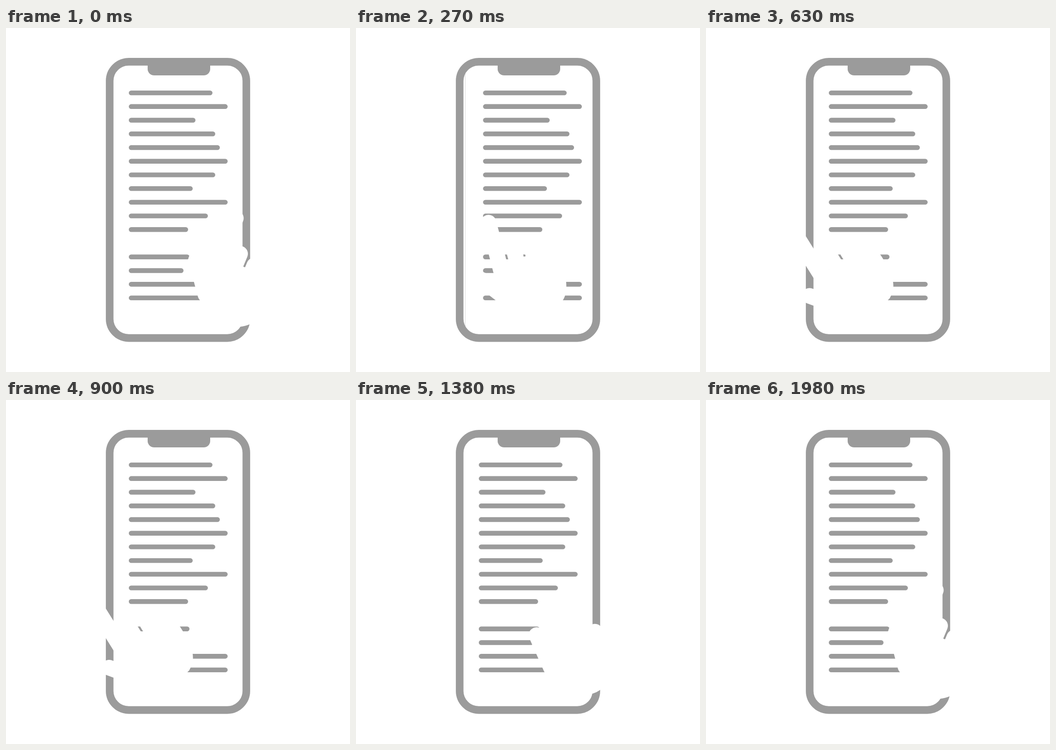
Animation of 748x748 px, one loop 2400 ms. Source, as an HTML page:

```html
<!DOCTYPE html>
<html lang="en">
<head>
<meta charset="utf-8">
<title>Swipe</title>
<style>
  html, body { margin: 0; width: 100%; height: 100%; overflow: hidden; background: #fff; }
  svg { display: block; width: 100%; height: 100%; }
</style>
</head>
<body>
<svg viewBox="0 0 748 748">
  <defs>
    <clipPath id="screen"><rect x="226" y="74" width="296" height="600" rx="40"/></clipPath>
    <path id="page" fill="none" stroke="#9b9b9b" stroke-width="10.4" stroke-linecap="round"/>
  </defs>
  <g clip-path="url(#screen)">
    <use id="oldPage" href="#page"/>
    <use id="newPage" href="#page"/>
    <path id="seam" d="M0 85V658" stroke="#9b9b9b" opacity=".4"/>
  </g>
  <rect x="225.4" y="73.4" width="297.2" height="600.7" rx="41.5" fill="none" stroke="#9b9b9b" stroke-width="16.6"/>
  <path d="M308 76H444V89a14 14 0 0 1-14 14H322a14 14 0 0 1-14-14Z" fill="#9b9b9b"/>
  <g id="hand" fill="#fff">
    <path id="fingers" fill="none" stroke="#fff" stroke-width="34" stroke-linecap="round"/>
    <path d="M-17 91H131.9C133 120 135 150 130 171C126 192 118 204 100 214C70 222 30 220 4 205L-17 150Z"/>
  </g>
</svg>
<script>
const LOOP = 2400, STEP = 30;
const SWIPE_TIME = 300, PAGE_GAP = 328;
const LEFT = 267, CAP = 5.2, FIRST_ROW = 141.1, ROW_GAP = 29.72;
const FINGER_GAP = 38.3, WRIST = { x: 40, y: 230 };

// Right end of each text row; 0 leaves the row blank.
const rowEnds = [449, 482, 412, 455, 465, 482, 455, 406, 482, 439, 396, 0, 399, 386, 482, 482];

const el = id => document.getElementById(id);
const mix = (a, b, u) => a + (b - a) * u;
const smooth = u => u * u * (3 - 2 * u);
const phase = (t, from, to) => Math.min(Math.max((t - from) / (to - from), 0), 1);

// Cubic Bezier easing with flat ends and handles at x1 and x2.
const bezier = (x1, x2) => u => {
  let low = 0, high = 1;
  for (let i = 0; i < 24; i++) {
    const s = (low + high) / 2, r = 1 - s;
    if (3 * r * r * s * x1 + 3 * r * s * s * x2 + s ** 3 < u) low = s;
    else high = s;
  }
  return smooth(low);
};
const tiltOut = bezier(0.457, 0), tiltBack = bezier(0.58, 0), slideOut = bezier(0.276, 0.094);

function handPose(t) {
  const out = phase(t, 0, 750);
  const swing = tiltOut(out) - tiltBack(phase(t, 780, 1980));
  const slide = slideOut(out) - smooth(phase(t, 1050, 1390));
  const lift = tiltOut(out) - smooth(phase(t, 900, 1110));
  return {
    x: mix(448.3, 356, slide),
    y: mix(641.2, 633, lift),
    tilt: mix(22.6, -32.6, swing)
  };
}

function draw(t) {
  const offset = PAGE_GAP * (1 - smooth(phase(t, 0, SWIPE_TIME)));
  el('oldPage').setAttribute('x', offset - PAGE_GAP);
  el('newPage').setAttribute('x', offset);
  el('seam').setAttribute('transform', `translate(${229.5 + offset * 0.865})`);
  el('seam').setAttribute('visibility', offset > 0 && offset < 30 ? 'visible' : 'hidden');

  const { x, y, tilt } = handPose(t);
  el('hand').setAttribute('transform',
    `translate(${x} ${y}) rotate(${tilt}) translate(${-WRIST.x} ${-WRIST.y})`);
}

function build() {
  el('page').setAttribute('d', rowEnds.map((end, i) =>
    end ? `M${LEFT + CAP} ${FIRST_ROW + i * ROW_GAP}H${end - CAP}` : '').join(''));

  const thumb = 'M-45 117L3 179';
  let fingers = thumb;
  for (let i = 0; i < 4; i++) {
    const tip = i ? 56.5 + 11.5 * i : 0;
    fingers += `M${i * FINGER_GAP} ${tip}V150`;
  }
  el('fingers').setAttribute('d', fingers);
}

const start = performance.now();
function tick() {
  const t = (performance.now() - start) % LOOP;
  draw(Math.floor(t / STEP) * STEP);
  requestAnimationFrame(tick);
}
build();
draw(0);
requestAnimationFrame(tick);
</script>
</body>
</html>
```
